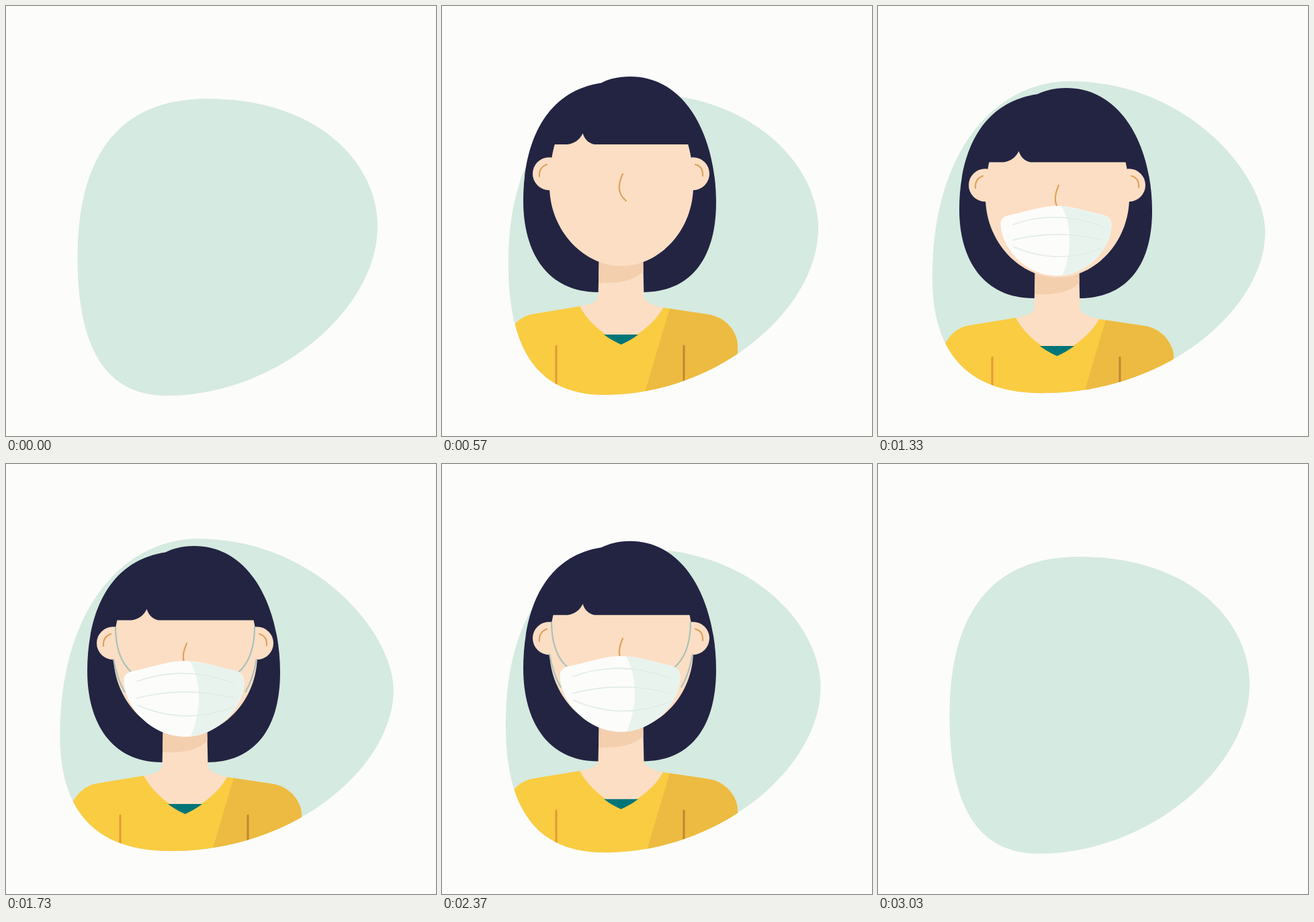
These frames come from a looping animation (640x640 px, 3060 ms). An HTML page:

```html
<!DOCTYPE html>
<html lang="en">
<head>
<meta charset="utf-8">
<title>Face mask</title>
<style>
  html, body { margin: 0; width: 100%; height: 100%; overflow: hidden; background: #fcfcfa; }
  svg { display: block; width: 100vw; height: 100vh; }
  .line { fill: none; stroke-linecap: round; }
  .fold { stroke: #dfece5; stroke-width: 1.6; }
  .string { stroke: #a9c2bb; stroke-width: 2.2; stroke-linecap: butt; }
  .feature { stroke: #dfa25c; stroke-width: 2.2; }
  .hair { fill: #232442; }
  .skin { fill: #fcdec4; }
</style>
</head>
<body>
<svg viewBox="0 0 640 640">
  <defs>
    <clipPath id="window"><path id="windowPath"/></clipPath>
    <clipPath id="shirtClip"><use href="#shirt"/></clipPath>
    <clipPath id="maskClip"><use href="#maskShape"/></clipPath>
    <clipPath id="neckClip"><use href="#neck"/></clipPath>
  </defs>
  <path id="blob" fill="#d5eae0"/>
  <g clip-path="url(#window)">
    <g id="person">
      <path id="backHair" class="hair" d="M232 444C157 444 121 385 121 308C121 230 148 145 237 131.5C250 125 265 122 280 122C365 122 408 215 408 310C408 400 365 444 300 444Z"/>

      <path id="shirt" fill="#facc42" d="M205 464L135 475.5C109 480 94 506 94 525V760H440V522C440 504 424 480 396 476L329 466L266.5 521Z"/>
      <path clip-path="url(#shirtClip)" fill="#edbb41" d="M341 460L251 764H460V460Z"/>
      <path class="line" stroke="#e29a38" stroke-width="3" d="M170 523V760"/>
      <path class="line" stroke="#c08634" stroke-width="3" d="M360 523V760"/>

      <path id="neck" class="skin" d="M234 380L232.5 450Q232 459 205 464C216 484 232 500 266.5 521C302 500 318 486 329 466Q301 459 300.5 450L299 380Z"/>
      <path fill="#007577" d="M241 506H292Q282 514 266.5 521Q251 514 241 506Z"/>
      <path clip-path="url(#neckClip)" fill="#f4cfae" d="M225 380H305V403C298 422 268 433 225 428Z"/>

      <circle class="skin" cx="159.5" cy="266.7" r="24.5"/>
      <circle class="skin" cx="373.5" cy="266.7" r="24.5"/>
      <path class="skin" d="M160 285C160 350 210 404 267 404C324 404 374 350 374 285C374 260 371 240 366 222L358 200H176L168 222C163 240 160 260 160 285Z"/>
      <path id="fringe" class="hair" d="M172 190H360L380 222V232.5H227Q214 230 209.5 216Q203 230 187 232.5H155V222Z"/>

      <path class="line feature" d="M156 253Q144 257 145 271"/>
      <path class="line feature" d="M377 253Q389 256 388 270"/>
      <path class="line feature" d="M269 267C262 282 261 297 274 307"/>

      <g id="strings">
        <path class="line string" pathLength="1" d="M187 310C170 295 163 270 163 242"/>
        <path class="line string" pathLength="1" d="M346 310C363 295 370 270 370 242"/>
        <path class="line string" pathLength="1" d="M177 340Q165 320 160 290"/>
        <path class="line string" pathLength="1" d="M356 340Q368 320 373 290"/>
      </g>
      <g id="mask">
        <path id="maskShape" fill="#fcfcfb" d="M190 308C215 303 243 293 267 293C291 293 320 303 342 308Q354 311 354.5 322C356 360 316 406 267 406C215 406 176 360 175.5 322Q175 311 190 308Z"/>
        <path clip-path="url(#maskClip)" fill="#e9f3ee" d="M270 288C290 315 294 365 273 410H365V288Z"/>
        <path class="line fold" d="M195 323.5Q266 298 340 326.5"/>
        <path class="line fold" d="M195 348.5Q266 330 340 348.5"/>
        <path class="line fold" d="M196 359Q267 390 340 361"/>
      </g>
    </g>
  </g>
</svg>
<script>
const LOOP = 3060;
const el = id => document.getElementById(id);
const strings = [...document.querySelectorAll('.string')];

const lerp = (a, b, p) => a + (b - a) * p;
const smooth = p => p * p * (3 - 2 * p);
const quad = p => p < .5 ? 2 * p * p : 1 - 2 * (1 - p) * (1 - p);

// Eased value from [time, value] steps.
function track(steps, t) {
  if (t <= steps[0][0]) return steps[0][1];
  for (let i = 1; i < steps.length; i++) {
    const [t0, a] = steps[i - 1], [t1, b] = steps[i];
    if (t < t1) return lerp(a, b, smooth((t - t0) / (t1 - t0)));
  }
  return steps[steps.length - 1][1];
}

// Left, top, right and bottom points, then two handle lengths per quarter.
const small = [106.5, 375, 300, 138, 553, 328, 240, 580, 191, 97, 165, 94, 125, 160, 70, 165];
const large = [79.5, 405, 285, 110.5, 577.5, 337, 245, 576, 192, 108, 175, 85, 110, 190, 119, 105];

// The exit mirrors the entry: overshoot on arrival, wind-up before leaving.
const rise = [[20, 480], [500, -19], [860, 0], [2218, 0], [2580, -19], [3030, 480]];
const hairDrop = [[570, -1], [1000, -5], [1330, -9], [1730, 0], [2230, 0], [2390, 6], [2670, 9], [3030, 0]];
const fringeLift = [[560, -9.5], [1000, 0], [2270, 0], [2670, -2]];
const maskSize = [[1000, 0], [1400, 1]];
const stringGrow = [[1440, 0], [1690, 1]];

function drawBlob(t) {
  const p = t < 1560 ? t / 1560 : (LOOP - t) / 1500;
  const e = (quad(p) + smooth(p)) / 2;
  const [lx, ly, tx, ty, rx, ry, bx, by, a, b, c, d, f, g, h, k] =
    small.map((v, i) => lerp(v, large[i], e));
  el('blob').setAttribute('d', `M${lx} ${ly}C${lx} ${ly - a} ${tx - b} ${ty} ${tx} ${ty}` +
    `C${tx + c} ${ty} ${rx} ${ry - d} ${rx} ${ry}` +
    `C${rx} ${ry + f} ${bx + g} ${by} ${bx} ${by}` +
    `C${bx - h} ${by} ${lx} ${ly + k} ${lx} ${ly}Z`);
  // Open above, so the head may leave the blob at the top.
  el('windowPath').setAttribute('d', `M${lx} -40V${ly}` +
    `C${lx} ${ly + k} ${bx - h} ${by} ${bx} ${by}` +
    `C${bx + g} ${by} ${rx} ${ry + f} ${rx} ${ry}V-40Z`);
}

function drawPerson(t) {
  el('person').setAttribute('transform', `translate(0 ${track(rise, t)})`);
  const stretch = 1 + track(hairDrop, t) / 322;
  el('backHair').setAttribute('transform', `translate(0 122) scale(1 ${stretch}) translate(0 -122)`);
  el('fringe').setAttribute('transform', `translate(0 ${track(fringeLift, t)})`);

  const size = track(maskSize, t);
  el('mask').style.display = size > 0 ? '' : 'none';
  el('mask').setAttribute('transform', `translate(265 349.5) scale(${size}) translate(-265 -349.5)`);

  const grown = track(stringGrow, t);
  el('strings').style.display = grown > 0 ? '' : 'none';
  for (const s of strings) s.style.strokeDasharray = grown < 1 ? `${grown} 2` : 'none';
}

const start = performance.now();
function draw(now) {
  const t = Math.max(0, now - start) % LOOP;
  drawBlob(t);
  drawPerson(t);
  requestAnimationFrame(draw);
}
draw(start);
</script>
</body>
</html>
```
